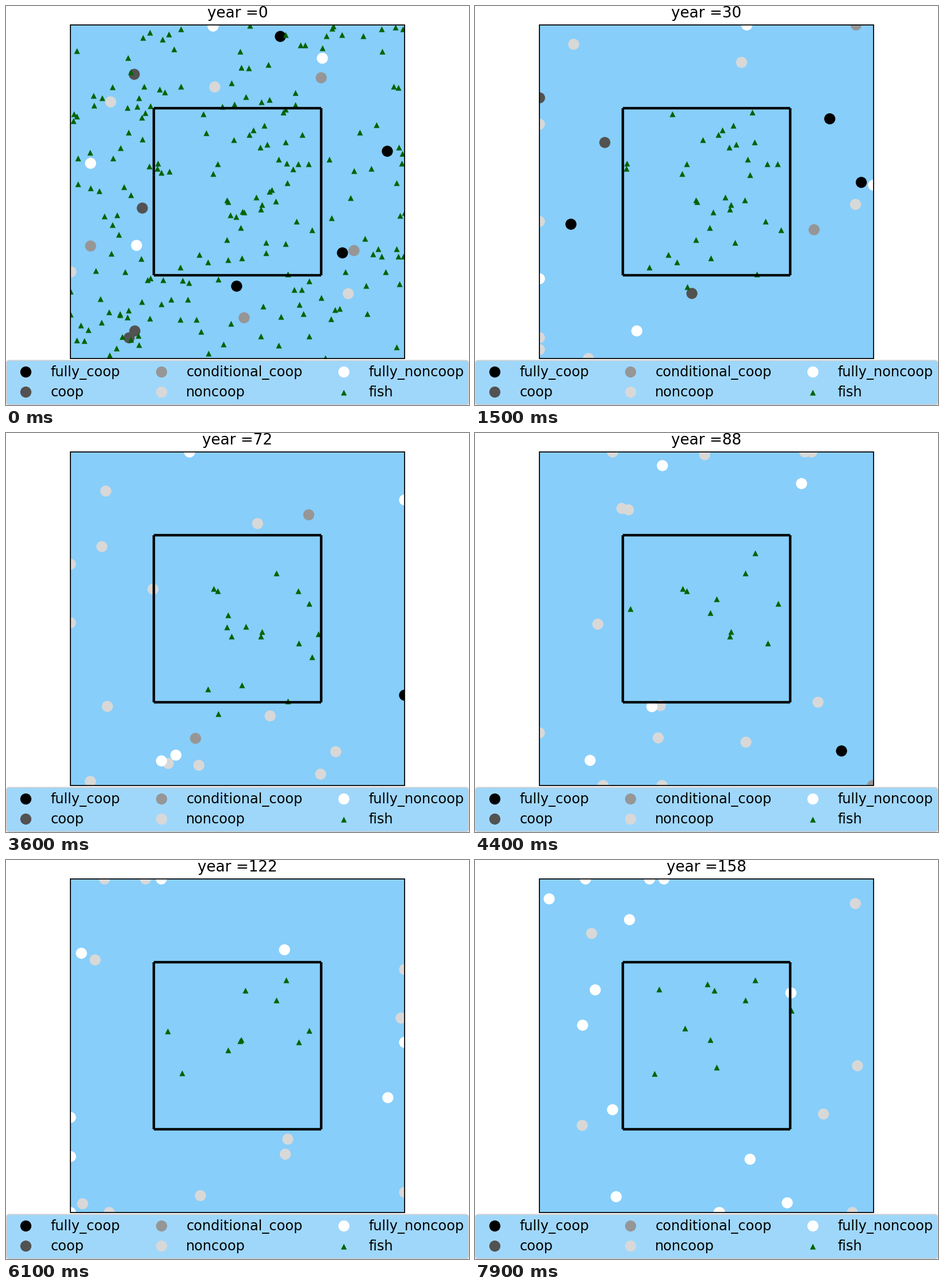
Recreate the animation shown at these times as a matplotlib script. Size 805 px wide and 695 px high, loop 8 s.

```python
import numpy as np
import matplotlib.pyplot as plt
from matplotlib.animation import FuncAnimation
from matplotlib.patches import FancyBboxPatch, Rectangle

W, H, DPI = 805, 695, 80
PX = 72 / DPI  # one pixel in points
FRAMES, STEP_MS, YEARS_PER_FRAME = 80, 100, 2
CENTRE = np.array([402.5, 323.5])
HALF, RESERVE = 290.5, 145.25
KINDS = ["fully_coop", "coop", "conditional_coop", "noncoop", "fully_noncoop"]
COLOURS = np.array(["black", "#525252", "#969696", "#d8d8d8", "white"])
NONCOOP, FULLY_NONCOOP = 3, 4
SEA, FISH = "lightskyblue", "darkgreen"

# Opening places, four boats of each kind in turn
HARBOUR = [(477, 53), (663, 253), (585, 430), (401, 488),
           (223, 119), (237, 352), (224, 566), (214, 578),
           (548, 125), (147, 418), (605, 426), (414, 543),
           (363, 141), (182, 167), (113, 463), (595, 501),
           (360, 35), (550, 91), (147, 274), (227, 417)]
# Longest-lived fish of the reserve, first caught first
RESIDENTS = [(449, 208), (396, 233), (454, 241), (264, 274), (263, 283),
             (360, 292), (474, 267), (508, 275), (384, 338), (532, 390),
             (410, 439), (351, 446), (490, 467), (368, 275), (445, 346),
             (443, 354)]

rng = np.random.default_rng(12)


def in_reserve(points):
    return np.abs(points - CENTRE).max(-1) < RESERVE


def sail():
    """Random walk that stops at the shore and never enters the reserve."""
    place = [np.array(HARBOUR, float)]
    for _ in range(FRAMES - 1):
        here = place[-1]
        there = here + rng.normal(0, 60, here.shape)
        there = np.clip(there, CENTRE - HALF, CENTRE + HALF)
        place.append(np.where(in_reserve(there)[:, None], here, there))
    return np.array(place)


def change_kinds():
    """Cooperators defect early; later more boats stop cooperating fully."""
    kinds = np.tile(np.repeat(np.arange(5), 4), (FRAMES, 1))
    defect = 6 + 46 * np.linspace(0, 1, 12) ** 1.5
    for boat, when in zip(rng.permutation(12), defect):
        kinds[int(when):, boat] = NONCOOP
    harden = np.linspace(48, 78, 9)
    for boat, when in zip(rng.permutation(16), harden):
        kinds[int(when):, boat] = FULLY_NONCOOP
    return kinds


def scatter_fish(count, inside):
    points = CENTRE + rng.uniform(-HALF, HALF, (count * 8, 2))
    return points[in_reserve(points) == inside][:count]


def school(points, born, caught):
    """Rows of x, y, first frame, end frame."""
    n = len(points)
    return np.column_stack([points, np.broadcast_to(born, n),
                            np.broadcast_to(caught, n)])


def stock():
    hatch = np.linspace(8, 78, 40).astype(int)
    return np.vstack([
        school(scatter_fish(151, False), 0,
               np.clip(rng.exponential(4, 151), 1, 14)),
        school(scatter_fish(33, True), 0, rng.integers(1, 28, 33)),
        school(RESIDENTS, 0, np.linspace(28, 48, len(RESIDENTS))),
        school(CENTRE + rng.normal(0, 75, (40, 2)), hatch,
               hatch + 1 + rng.exponential(20, 40)),
    ])


boats, kinds, shoal = sail(), change_kinds(), stock()

plt.rcParams["font.family"] = "DejaVu Sans"
fig = plt.figure(figsize=(W / DPI, H / DPI), dpi=DPI, facecolor="white")
ax = fig.add_axes([0, 0, 1, 1])
ax.set(xlim=(0, W), ylim=(H, 0))
ax.axis("off")


def square(**style):
    return ax.add_patch(Rectangle(CENTRE - HALF, 2 * HALF, 2 * HALF, **style))


def boat_marks(x, y, colour):
    return ax.scatter(x, y, (19.3 * PX) ** 2, colour, "o", lw=0, zorder=2)


def fish_marks(x, y):
    return ax.scatter(x, y, (10.1 * PX) ** 2, FISH, "^", lw=0, zorder=3)


sea = square(fc=SEA, lw=0, zorder=0)
square(fill=False, ec="black", lw=1.75 * PX, zorder=5)
(x0, y0), (x1, y1) = CENTRE - RESERVE, CENTRE + RESERVE
edge = dict(colors="black", lw=4.37 * PX, zorder=4)
ax.hlines([y0, y1], x0, x1, **edge)
ax.vlines([x0, x1], y0, y1, **edge)

ax.add_patch(FancyBboxPatch((1, 617.5), 803, 77,
                            boxstyle="round,pad=0,rounding_size=4.8",
                            fc=SEA, ec="0.8", lw=2.1 * PX, alpha=0.8, zorder=1))
for i, name in enumerate(KINDS + ["fish"]):
    x, y = (34, 270, 587)[i // 2], (637, 672)[i % 2]
    if name == "fish":
        fish_marks(x, y + 0.5)
    else:
        boat_marks(x, y, COLOURS[i])
    ax.text(x + 43.2, y + 8.2, name, size=24 * PX, va="baseline")

title = ax.text(CENTRE[0], 19.9, "", size=26.2 * PX, ha="center", va="baseline")
fleet, fish = boat_marks([], [], None), fish_marks([], [])
for marks in (fleet, fish):
    marks.set_clip_path(sea)


def draw(n):
    title.set_text(f"year ={n * YEARS_PER_FRAME}")
    order = np.argsort(kinds[n], kind="stable")
    fleet.set_offsets(boats[n][order])
    fleet.set_facecolor(COLOURS[kinds[n][order]])
    alive = (shoal[:, 2] <= n) & (n < shoal[:, 3])
    fish.set_offsets(shoal[alive, :2])
    return [title, fleet, fish]


anim = FuncAnimation(fig, draw, frames=FRAMES, interval=STEP_MS, repeat=True)
plt.show()
```
